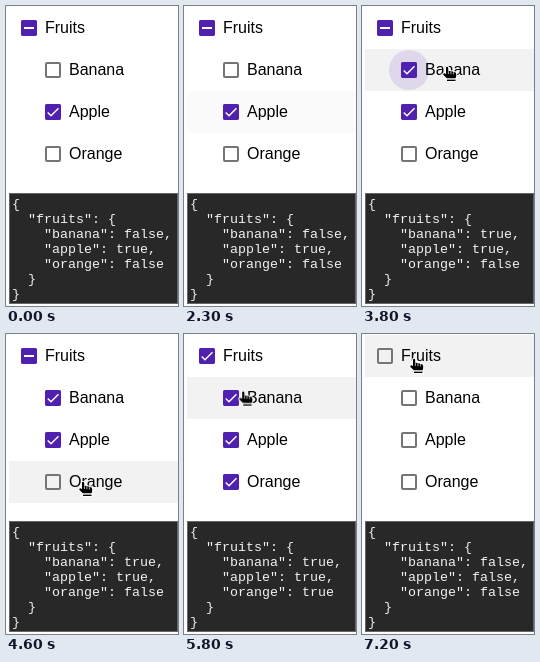
An HTML page that plays this animation: 172x300 px, repeating every 8 s.

```html
<!DOCTYPE html>
<html lang="en">
<head>
<meta charset="utf-8">
<title>Checkbox tree</title>
<style>
html, body { margin: 0; width: 100%; height: 100%; overflow: hidden; background: #fff; }
svg, .text { position: absolute; }
svg { left: 0; top: 0; width: 172px; height: 300px; }
.text { white-space: pre; line-height: 0; }
/* A strut standing on the baseline, so that top = baseline - 30px */
.text::before { content: ""; display: inline-block; height: 30px; }
.label { font-family: "Liberation Sans", Arial, sans-serif; font-size: 16px; color: #000; }
.code { font-family: "Liberation Mono", monospace; font-size: 13.333px; color: #f2f2f2; }
.row { fill: #f2f2f2; opacity: 0; }
.box { fill: none; stroke: #757575; stroke-width: 2; }
.fill { fill: #5020b0; }
.mark { fill: none; stroke: #fff; stroke-width: 1.42; }
.ripple { fill: #5020b0; opacity: 0; transform-box: fill-box; transform-origin: center; }
.hand { fill: #000; stroke: #fff; stroke-width: 2; stroke-linejoin: round; paint-order: stroke; }
.fingers { fill: none; stroke: #fff; stroke-width: .7; }
</style>
</head>
<body>
<svg id="stage" viewBox="0 0 172 300"></svg>
<svg id="overlay" viewBox="0 0 172 300"></svg>
<script>
const LOOP = 8000;
const stage = document.getElementById('stage');
const overlay = document.getElementById('overlay');

function add(parent, tag, attrs) {
  const el = document.createElementNS('http://www.w3.org/2000/svg', tag);
  for (const key in attrs) el.setAttribute(key, attrs[key]);
  parent.append(el);
  return el;
}

function write(kind, x, baseline, text) {
  const el = document.createElement('div');
  el.className = 'text ' + kind;
  el.style.left = x + 'px';
  el.style.top = baseline - 30 + 'px';
  el.textContent = text;
  overlay.before(el);
  return el;
}

// steps: [time, properties, easing?]
function track(el, steps, easing = 'linear') {
  const list = steps.filter(s => s[0] <= LOOP);
  if (list[0][0] > 0) list.unshift([0, list[0][1]]);
  const last = list[list.length - 1];
  if (last[0] < LOOP) list.push([LOOP, last[1]]);
  el.animate(
    list.map(([t, props, ease]) => ({ offset: t / LOOP, easing: ease || easing, ...props })),
    { duration: LOOP, iterations: Infinity });
}

const hold = (el, steps) =>
  track(el, steps.map(([t, opacity]) => [t, { opacity }]), 'steps(1, end)');

// changes: [time, on]; the first entry is the starting value
function fade(el, changes, ms) {
  const steps = [];
  let value = changes[0][1];
  for (const [t, on] of changes) {
    steps.push([t, { opacity: value }]);
    if (t > 0) steps.push([t + ms, { opacity: on }]);
    value = on;
  }
  track(el, steps);
}

const items = [
  { name: 'Fruits', x: 15, press: 6600, state: [[0, 1], [6700, 0]],
    check: [[0, 0], [4800, 1], [6700, 0]], dash: [[0, 1], [4800, 0]],
    hover: [[0, 0], [5900, 1]] },
  { name: 'Banana', x: 39, press: 3600, state: [[0, 0], [3700, 1], [6700, 0]],
    hover: [[0, 0], [2650, 1], [4330, 0], [5600, 1], [5890, 0]] },
  { name: 'Apple', x: 39, state: [[0, 1], [6700, 0]],
    hover: [[0, 0], [2255, 1], [2660, 0], [5360, 1], [5610, 0]] },
  { name: 'Orange', x: 39, press: 4700, state: [[0, 0], [4800, 1], [6700, 0]],
    hover: [[0, 0], [4400, 1], [5390, 0]] }
];

items.forEach((item, i) => {
  const top = 1 + 42 * i;
  const row = add(stage, 'rect', { class: 'row', x: 3, y: top, width: 169, height: 42 });
  fade(row, item.hover, 150);
});

items.forEach(({ name, x, press, state, check, dash }, i) => {
  const y = 14 + 42 * i;
  const g = add(stage, 'g', { transform: `translate(${x} ${y})` });
  if (press) {
    const ripple = add(g, 'circle', { class: 'ripple', cx: 8, cy: 8, r: 20 });
    const pose = (opacity, size) => ({ opacity, transform: `scale(${size})` });
    track(ripple, [
      [press - 40, pose(0, 0)],
      [press - 39, pose(.12, .1), 'ease-out'],
      [press + 150, pose(.12, 1)],
      [press + 240, pose(.12, 1)],
      [press + 580, pose(0, 1)]
    ]);
  }
  add(g, 'rect', { class: 'box', x: 1, y: 1, width: 14, height: 14, rx: 1 });
  const on = add(g, 'g', {});
  fade(on, state, 90);
  add(on, 'rect', { class: 'fill', width: 16, height: 16, rx: 2 });
  const tick = add(on, 'path', { class: 'mark', d: 'M2.7 8.5 L6 11.7 L13.5 4.2' });
  if (check) fade(tick, check, 90);
  if (dash) {
    const bar = add(on, 'rect', { x: 3, y: 7, width: 10, height: 2, fill: '#fff' });
    fade(bar, dash, 90);
  }
  write('label', x + 24, y + 13, name);
});

add(stage, 'rect', { x: 3.5, y: 187.5, width: 168, height: 110, fill: '#282828', stroke: '#666' });

const code = (line, indent, text) => write('code', 6 + 8 * indent, 202 + 15 * line, text);

code(0, 0, '{');
code(1, 2, '"fruits": {');
items.slice(1).forEach(({ name, state }, i) => {
  const key = `"${name.toLowerCase()}": `;
  const comma = i < 2 ? ',' : '';
  hold(code(i + 2, 4, key + 'true' + comma), state);
  hold(code(i + 2, 4, key + 'false' + comma), state.map(([t, v]) => [t, 1 - v]));
});
code(5, 2, '}');
code(6, 0, '}');

// Pointer, with the fingertip at the local origin
const cursor = add(overlay, 'g', {});
add(cursor, 'path', { class: 'hand', d: 'M-1 13.5 H7.5 V15 H-1 Z' });
add(cursor, 'path', { class: 'hand', d:
  'M-2 2 Q-2 .8 -.9 .8 Q.2 .8 .2 2 V5 Q1.8 4.6 2.8 5.4 Q4.4 5 5.4 6 ' +
  'Q8.2 5.8 8.2 8 V10 Q8.2 11.2 7.4 12.2 H-1.2 L-4.6 9 ' +
  'Q-5.2 7.6 -4 7.2 Q-3 7 -2 8.2 Z' });
add(cursor, 'path', { class: 'fingers', d: 'M.4 5.2 V8 M2.9 5.6 V8.2 M5.4 6.2 V8.4' });

hold(cursor, [[0, 0], [2380, 1]]);
track(cursor, [
  [2380, 151, 96],
  [2700, 110, 78],
  [3080, 86, 60],
  [4260, 86, 60],
  [4520, 78, 147],
  [5200, 78, 147],
  [5300, 76, 139],
  [5400, 71, 112],
  [5650, 65, 79],
  [5900, 57, 42],
  [6200, 53, 24]
].map(([t, x, y]) => [t, { transform: `translate(${x}px, ${y}px)` }]));
</script>
</body>
</html>
```
